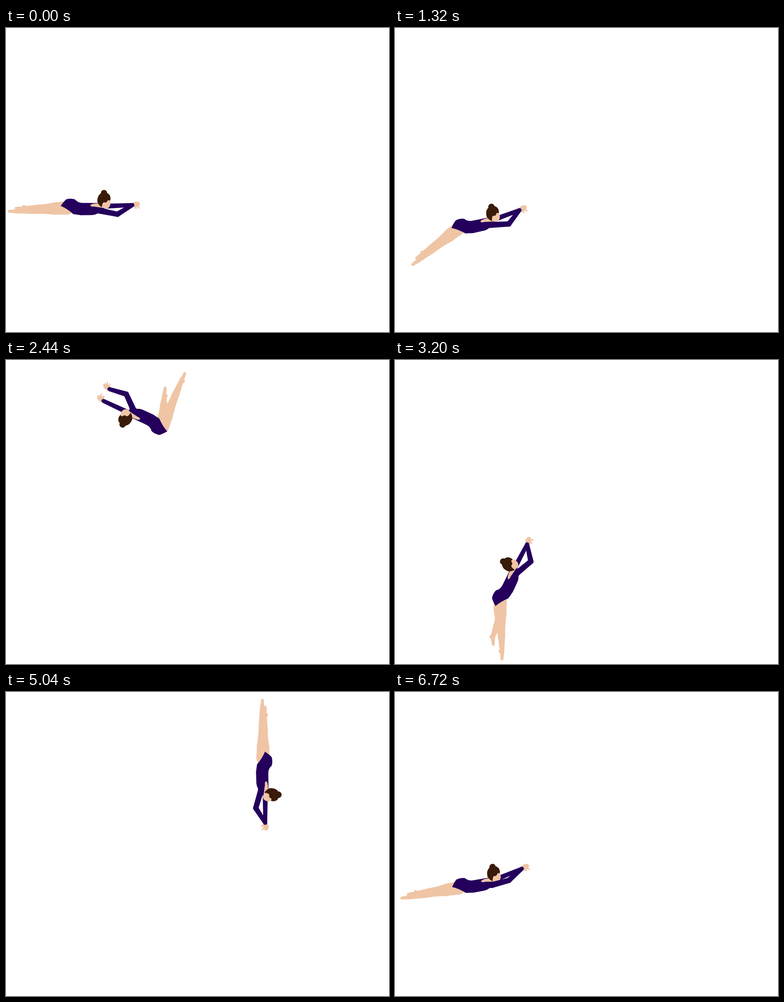
An HTML page with a canvas that plays this animation: 840x667 px, repeating every 6.76 s.

```html
<!DOCTYPE html>
<html lang="en">
<head>
<meta charset="utf-8">
<title>Uneven bars routine</title>
<style>
html, body { margin: 0; width: 100%; height: 100%; overflow: hidden; background: #fff; }
canvas { display: block; }
</style>
</head>
<body>
<canvas id="stage" width="840" height="667"></canvas>
<script>
const ctx = document.getElementById('stage').getContext('2d');
const LOOP = 6760, STEP = 40, RAD = Math.PI / 180;
const SKIN = '#efc5a5', SUIT = '#24005c', HAIR = '#3a1a08';
const LOW = [287, 388], HIGH = [570, 297];

// Turning points of the swings: [time, shoulder-to-hip angle]
const swings = [
  [-460, 50], [90, 192], [750, -50], [1430, 187], [2040, -85], [2440, -333], [2860, -412],
  [3200, -242], [3540, -163], [3940, -307], [4240, -258], [4900, -448], [5300, -450],
  [6120, -263], [6300, -310], [6850, -168]
];

// Between bars the hips travel straight from release to catch, plus an arc
const flights = [
  { from: 2020, to: 2860, lift: 105 },
  { from: 3940, to: 4240, lift: 48 },
  { from: 6040, to: 6300, lift: 36 }
];

// The neutral shape, and the moments that bend it away
const neutral = { legs: -2, arms: -9, split: 3, reach: .86, knee: 0, elbow: 16, spread: 0, dx: 0, dy: 0 };
const moments = [
  { t: 1320, w: 150, legs: -20, arms: -9, dx: -5, dy: 7 },
  { t: 2440, w: 170, legs: -100, arms: 23, split: -22, reach: -.24, spread: 29, dx: -7 },
  { t: 3200, w: 150, legs: -20, split: 2, reach: -.13, knee: 18, elbow: 4, dx: 6, dy: 7 },
  { t: 4320, w: 150, legs: 2, split: 11, dx: 5 },
  { t: 5880, w: 150, legs: -9, arms: -16, elbow: 2, dx: -6 },
  { t: 6680, w: 60, legs: 10, arms: -18, elbow: -11, dy: -8 }
];

const suitPath = new Path2D('M-15-2Q-8-13-3-17Q8-20 16-17Q22-10 32-10L66-11L78-2L82 6L76 12L66 12Q60 16 50 16L30 17L13 15Q0 4-15-2Z');
const neckPath = new Path2D('M50-6Q54-10 68-10L80-12L84 0Q66-2 58-3Q50-2 50-6Z');
const hairPath = new Path2D('M65-14Q64-28 73-33Q84-37 91-30Q95-24 93-17L88-18Q85-11 81-13Q76-14 75-2Q68-6 65-14Z');

// Monotone cubic: eases to rest at every turning point
function turnAt(t) {
  const last = swings.length - 1;
  let i = 0;
  while (i < last - 1 && t >= swings[i + 1][0]) i++;
  const slope = k => (swings[k + 1][1] - swings[k][1]) / (swings[k + 1][0] - swings[k][0]);
  const tangent = k => {
    if (k === 0 || k === last) return 0;
    const a = slope(k - 1), b = slope(k);
    return a * b <= 0 ? 0 : 2 * a * b / (a + b);
  };
  const [t0, a0] = swings[i], [t1, a1] = swings[i + 1];
  const w = t1 - t0, p = (t - t0) / w, q = 1 - p;
  return a0 * q * q * (1 + 2 * p) + a1 * p * p * (3 - 2 * p)
    + w * (tangent(i) * p * q * q - tangent(i + 1) * p * p * q);
}

function poseAt(t) {
  const pose = { ...neutral, turn: turnAt(t) };
  for (const { t: mid, w, ...bend } of moments) {
    const gap = Math.abs(t - mid), near = Math.min(gap, LOOP - gap) / w;
    for (const key in bend) pose[key] += bend[key] * Math.exp(-near * near);
  }
  // Legs pike on the backswing and trail on the forward swing
  pose.legs -= 25 * (turnAt(t + 10) - turnAt(t - 10)) / 20;
  pose.arm = 2 * Math.sqrt(38.5 ** 2 - pose.elbow ** 2);
  return pose;
}

const go = (p, deg, len) => [p[0] + Math.cos(deg * RAD) * len, p[1] + Math.sin(deg * RAD) * len];
const local = (hip, deg, u, v) => go(go(hip, deg + 180, u), deg - 90, v);

function hang(t) {
  const pose = poseAt(t), bar = t > 4090 && t < 6170 ? HIGH : LOW;
  const shoulder = go([bar[0] + pose.dx, bar[1] + pose.dy], pose.turn + pose.arms, 10 + pose.arm);
  return local(shoulder, pose.turn, -72, -6);
}

function hipAt(t, pose) {
  const f = flights.find(f => t > f.from && t < f.to);
  if (!f) return hang(t);
  const p = (t - f.from) / (f.to - f.from), a = hang(f.from), b = hang(f.to);
  return [
    a[0] + (b[0] - a[0]) * p + pose.dx,
    a[1] + (b[1] - a[1]) * p + pose.dy - f.lift * 4 * p * (1 - p)
  ];
}

function dot(p, r) {
  ctx.beginPath();
  ctx.arc(p[0], p[1], r, 0, 7);
  ctx.fill();
}

// Tapered, round-ended segment
function limb(p, q, r1, r2) {
  const dx = q[0] - p[0], dy = q[1] - p[1], len = Math.hypot(dx, dy) || 1;
  const nx = -dy / len, ny = dx / len;
  ctx.beginPath();
  ctx.moveTo(p[0] + nx * r1, p[1] + ny * r1);
  ctx.lineTo(q[0] + nx * r2, q[1] + ny * r2);
  ctx.lineTo(q[0] - nx * r2, q[1] - ny * r2);
  ctx.lineTo(p[0] - nx * r1, p[1] - ny * r1);
  ctx.fill();
  dot(p, r1);
  dot(q, r2);
}

function leg(root, deg, bend, size) {
  const shin = deg + bend, foot = deg + 3 - bend / 2;
  const thigh = go(root, deg, 26 * size), k = go(root, deg, 56 * size);
  const calf = go(k, shin, 20 * size), ankle = go(k, shin, 54 * size);
  ctx.fillStyle = SKIN;
  limb(root, thigh, 14.5, 13);
  limb(thigh, k, 13, 9);
  limb(k, calf, 9, 8);
  limb(calf, ankle, 8, 4.8);
  dot(go(ankle, foot + 90, 3.5), 4);
  limb(ankle, go(ankle, foot, 17), 4.8, 3);
}

function hand(wrist, deg) {
  ctx.fillStyle = ctx.strokeStyle = SKIN;
  const palm = go(wrist, deg, 8);
  ctx.beginPath();
  ctx.ellipse(palm[0], palm[1], 9, 6, deg * RAD, 0, 7);
  ctx.fill();
  ctx.lineWidth = 2.4;
  ctx.lineCap = 'round';
  for (const along of [2, 9]) {
    ctx.beginPath();
    ctx.moveTo(...go(go(wrist, deg, along), deg + 90, 3));
    ctx.lineTo(...go(go(wrist, deg, along + 5), deg + 90, 9));
    ctx.stroke();
  }
}

function draw(t) {
  ctx.fillStyle = '#fff';
  ctx.fillRect(0, 0, 840, 667);

  const pose = poseAt(t), turn = pose.turn, hip = hipAt(t, pose);
  const thigh = turn + pose.legs, aim = turn + pose.arms + 180;
  const shoulder = local(hip, turn, 72, 6);
  const wrist = go(shoulder, aim, pose.arm);
  const farWrist = go(wrist, turn + 90, pose.spread);

  hand(farWrist, aim);
  ctx.fillStyle = SUIT;
  limb(local(hip, turn, 78, -4), farWrist, 5.5, 4.3);

  const root = local(hip, turn, -1, 2);
  leg(root, thigh + pose.split, pose.knee, pose.reach);
  leg(root, thigh, 0, 1);

  ctx.save();
  ctx.translate(...hip);
  ctx.rotate((turn + 180) * RAD);
  ctx.fillStyle = SUIT;
  ctx.fill(suitPath);
  ctx.fillStyle = SKIN;
  ctx.fill(neckPath);
  ctx.beginPath();
  ctx.ellipse(84, -11, 10, 12, 0, 0, 7);
  ctx.fill();
  ctx.fillStyle = HAIR;
  ctx.fill(hairPath);
  dot([79, -33], 7);
  ctx.restore();

  const elbow = go(go(shoulder, aim, pose.arm / 2), aim + 90, pose.elbow);
  hand(wrist, aim);
  ctx.fillStyle = SUIT;
  limb(shoulder, elbow, 6.5, 5.8);
  limb(elbow, wrist, 5.8, 4.4);
}

const start = performance.now();
function tick() {
  const t = (performance.now() - start) % LOOP;
  draw(Math.floor(t / STEP) * STEP);
  requestAnimationFrame(tick);
}
tick();
</script>
</body>
</html>
```
